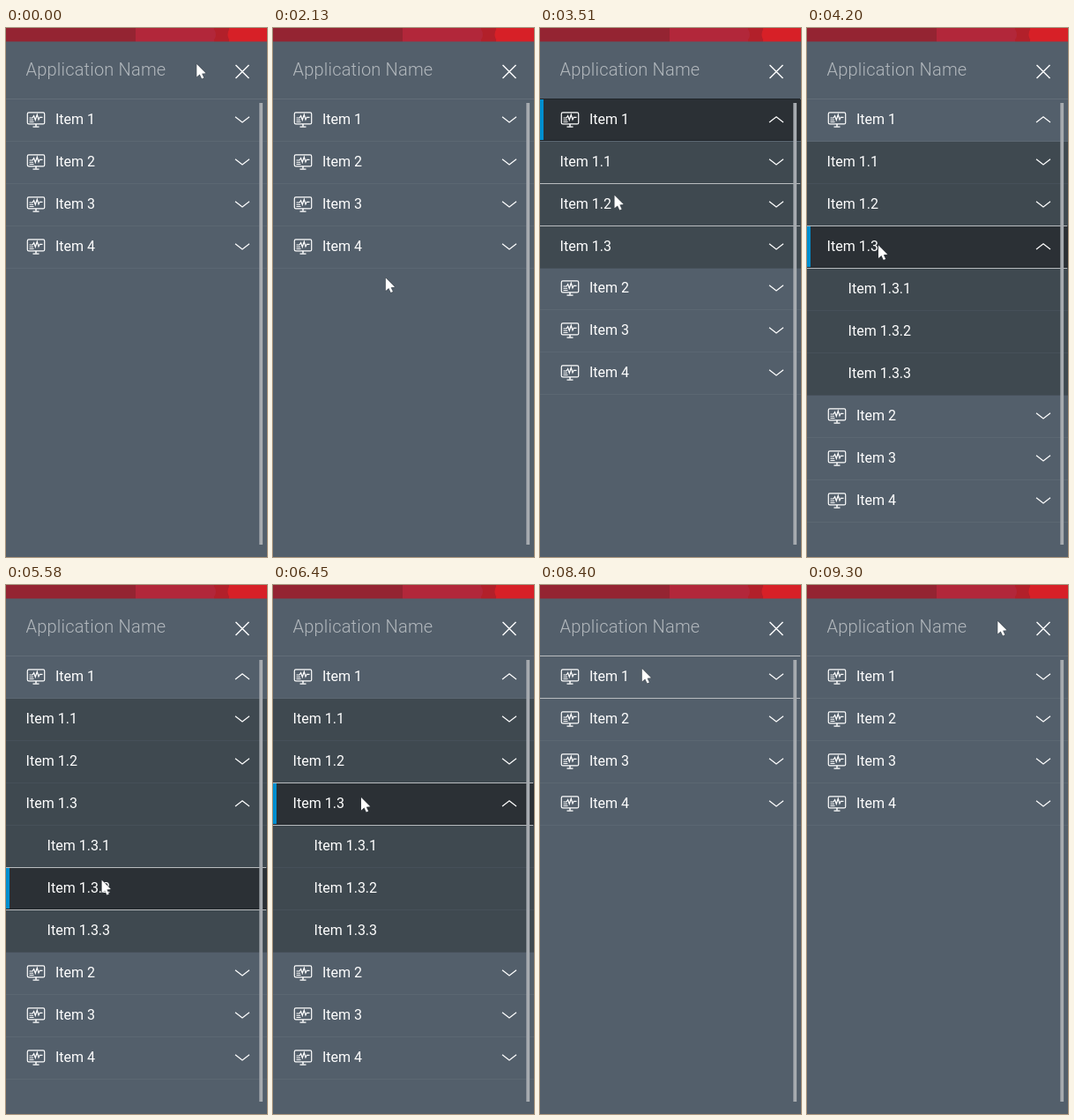
These frames come from a looping animation (296x600 px, 9.45 s). An HTML page with a canvas:

```html
<!DOCTYPE html>
<html lang="en">
<head>
<meta charset="utf-8">
<title>Side navigation</title>
<style>
  html, body { margin: 0; width: 100%; height: 100%; overflow: hidden; background: #535f6b; }
  canvas { display: block; width: 296px; height: 600px; }
</style>
</head>
<body>
<canvas id="stage" width="296" height="600"></canvas>
<script>
const ctx = document.getElementById('stage').getContext('2d');
const W = 296, H = 600, LOOP = 9450, STEP = 30, TOP = 80, ROW = 48;
const FONT = 'Roboto, "Open Sans", sans-serif';
const BASE = '#535f6b', SUB = '#3f4950', ACTIVE = '#2b3035';
const INDENT = [56, 22.6, 46.6];

// Pointer moves: start, end, target x, target y
const HOME = [216.3, 41];
const MOVES = [
  [750, 1650, 128.3, 285.7],
  [2100, 2850, 90, 102],
  [3090, 3900, 81, 246.5],
  [4260, 4800, 108.8, 336.5],
  [5550, 6150, 100, 241],
  [6600, 7200, 115.8, 95],
  [8850, 9300, ...HOME]
];

// Menu states: time, open depth, active item
const STATES = [
  [0, 0, ''],
  [3030, 1, '1'],
  [4200, 2, '1.3'],
  [5100, 2, '1.3.2'],
  [6450, 2, '1.3'],
  [7620, 1, '1'],
  [8400, 0, '']
];

const ease = t => {
  const u = Math.pow(t, 0.85);
  return u * u * (3 - 2 * u);
};

function pointerAt(t) {
  let [x, y] = HOME;
  for (const [start, end, tx, ty] of MOVES) {
    if (t <= start) break;
    const k = ease(Math.min(1, (t - start) / (end - start)));
    x += (tx - x) * k;
    y += (ty - y) * k;
  }
  return [x, y];
}

function rect(x, y, w, h, color) {
  ctx.fillStyle = color;
  ctx.fillRect(x, y, w, h);
}

function trace(points) {
  ctx.beginPath();
  points.forEach(([x, y], i) => i ? ctx.lineTo(x, y) : ctx.moveTo(x, y));
}

function stroke(points, width = 1.4) {
  trace(points);
  ctx.lineWidth = width;
  ctx.strokeStyle = '#fff';
  ctx.stroke();
}

function text(str, x, y, font, color, spacing = 0) {
  ctx.font = font + ' ' + FONT;
  ctx.letterSpacing = spacing + 'px';
  ctx.fillStyle = color;
  ctx.fillText(str, x, y);
}

function bulge(x, cx, color) {
  ctx.fillStyle = color;
  ctx.beginPath();
  ctx.moveTo(x, 0);
  ctx.quadraticCurveTo(cx, 7.5, x, 15);
  ctx.fill();
}

function band() {
  const h = 15.4;
  rect(0, 0, 147, h, '#942432');
  rect(147, 0, 89, h, '#b2273a');
  rect(236, 0, 17, h, '#b2202a');
  rect(253, 0, 43, h, '#d72027');
  bulge(235, 241, '#b2273a');
  bulge(254, 249, '#d72027');
}

function header() {
  text('Application Name', 22.5, 54, '300 20px', '#b2b8bd', 0.2);
  stroke([[260.5, 42], [275.5, 57]]);
  stroke([[275.5, 42], [260.5, 57]]);
  rect(0, TOP, W, 1, '#626d78');
}

function icon(y) {
  ctx.save();
  ctx.translate(24, y + 15.3);
  ctx.strokeStyle = '#fff';
  ctx.lineWidth = 1.2;
  ctx.beginPath();
  ctx.roundRect(0.3, 0.6, 19.4, 13, 1.5);
  ctx.stroke();
  stroke([[10, 13.6], [10, 16.5]], 1.5);
  stroke([[6.5, 16.8], [13.5, 16.8]], 1.3);
  stroke([[2.5, 6.7], [6, 6.7], [7.6, 4.2], [9.3, 9], [11.3, 3], [13, 8.6], [14.3, 6], [17.5, 6]], 1.2);
  stroke([[2.5, 9], [7, 9]], 1);
  stroke([[2.5, 11.2], [7.5, 11.2]], 1);
  ctx.restore();
}

function chevron(y, up) {
  const a = y + (up ? 27 : 20.8), b = y + (up ? 20.8 : 27);
  stroke([[260, a], [268, b], [276, a]], 1.2);
}

function layout(depth) {
  const rows = [];
  let y = TOP;
  const add = (id, open) => {
    rows.push({ id, y, open, level: id.split('.').length });
    y += ROW;
  };
  add('1', depth > 0);
  if (depth > 0) {
    add('1.1');
    add('1.2');
    add('1.3', depth > 1);
  }
  if (depth > 1) for (let i = 1; i < 4; i++) add('1.3.' + i);
  if (depth === 1) y--;
  for (let i = 2; i < 5; i++) add(String(i));
  return rows;
}

function edges(y, gap, color) {
  rect(0, y, W - 1, 1, color);
  rect(0, y + gap, W - 1, 1, color);
}

function drawRow({ id, y, open, level }, active) {
  if (level > 1) rect(0, y + 1, W, ROW, SUB);
  rect(0, y + ROW, W, 1, level > 1 ? '#465059' : '#5b6772');
  if (id === active) {
    rect(0, y + 1, W, ROW - 1, ACTIVE);
    edges(y, ROW - 1, '#20252a');
    rect(0, y + 1, 4, ROW - 2, '#008ecf');
  }
  if (level === 1) icon(y);
  text('Item ' + id, INDENT[level - 1], y + 29, '400 16px', '#fff');
  if (level < 3) chevron(y, open);
}

function menu(depth, active, py) {
  const rows = layout(depth);
  rows.forEach(row => drawRow(row, active));
  const hover = rows.find(r => py >= r.y && py < r.y + ROW);
  if (hover) edges(hover.y, ROW, '#b9bcbf');
}

function pointer(x, y) {
  ctx.save();
  ctx.translate(x, y);
  trace([[0, 0], [0, 14.5], [3.4, 11.6], [5.8, 16.6], [8.1, 15.6], [5.8, 10.7], [10.2, 10.2]]);
  ctx.closePath();
  ctx.lineJoin = 'round';
  ctx.lineWidth = 1.2;
  ctx.strokeStyle = 'rgba(60, 66, 72, 0.5)';
  ctx.stroke();
  ctx.fillStyle = '#fff';
  ctx.fill();
  ctx.restore();
}

function draw(now) {
  const t = Math.floor((now % LOOP) / STEP) * STEP;
  const [x, y] = pointerAt(t);
  const [, depth, active] = STATES.filter(s => s[0] <= t).pop();
  rect(0, 0, W, H, BASE);
  band();
  header();
  menu(depth, active, y);
  rect(287.3, 85, 3.8, 501, '#a6aaaf');
  pointer(x, y);
}

let begin;
function tick(now) {
  begin ??= now;
  draw(now - begin);
  requestAnimationFrame(tick);
}
draw(0);
requestAnimationFrame(tick);
</script>
</body>
</html>
```
